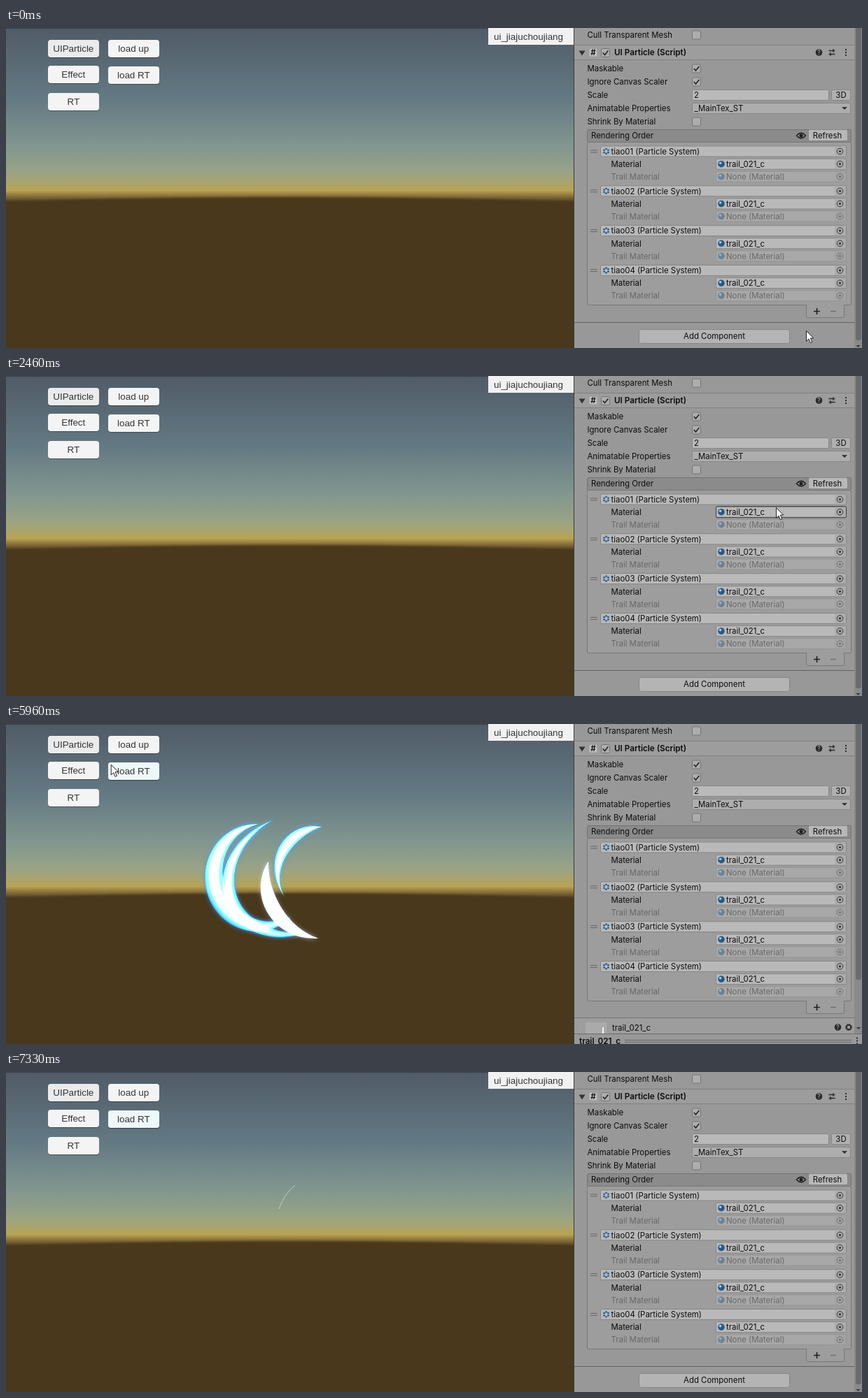
These frames come from a looping animation (1223 px wide and 458 px high, 8590 ms). An HTML page with a canvas:

```html
<!DOCTYPE html>
<html lang="en">
<head>
<meta charset="utf-8">
<title>UI particle preview</title>
<style>
  html, body { margin: 0; width: 100%; height: 100%; overflow: hidden; background: #989898; }
  svg, canvas { position: absolute; left: 0; top: 0; display: block; }
  text { font: 11.4px Inter, sans-serif; fill: #0b0b0b; white-space: pre; }
  .bold { font-size: 11.7px; font-weight: 600; }
  .dim { fill: #686868; }
  .mid { text-anchor: middle; }
  .game { font: 13.4px "Liberation Sans", Arial, sans-serif; fill: #343434; }
  #tint { animation: tint 8590ms step-end infinite; }
  @keyframes tint { 0% { opacity: 0; } 68.8%, 100% { opacity: 1; } }
</style>
</head>
<body>
<svg id="ui" width="1223" height="458" viewBox="0 0 1223 458"></svg>
<canvas id="fx" width="811" height="458"></canvas>
<svg width="1223" height="458" viewBox="0 0 1223 458">
  <path id="cursor" d="M.5.5V15.2L3.9 12 6.4 17.6 8.8 16.5 6.3 11H10.7Z" fill="#fff" stroke="#222"/>
</svg>
<script>
const LOOP = 8590;
const $ = id => document.getElementById(id);
const range = n => [...Array(n).keys()];
const show = (id, on) => $(id).setAttribute('visibility', on ? 'visible' : 'hidden');

// ---- static interface ----
const rect = (x, y, w, h, fill, extra = '') =>
  `<rect x="${x}" y="${y}" width="${w}" height="${h}" fill="${fill}" ${extra}/>`;
const text = (x, y, s, cls = '') => `<text x="${x}" y="${y + 4.2}" class="${cls}">${s}</text>`;
const path = (d, color, w = 1.2) => `<path d="${d}" fill="none" stroke="${color}" stroke-width="${w}"/>`;
const circle = (x, y, r, fill, extra = '') => `<circle cx="${x}" cy="${y}" r="${r}" fill="${fill}" ${extra}/>`;
const ring = (x, y, r, extra = '') => circle(x, y, r, 'none', `stroke="#2c2c2c" ${extra}`);
const box = (x, y, w, h, fill, line = '#868686', r = 2) =>
  rect(x + .5, y + .5, w - 1, h - 1, fill, `rx="${r}" stroke="${line}"`);
const field = (x, y, w) => box(x, y, w, 16, '#b9b9b9');
const arrow = (x, y, w, h) => `<path d="M${x - w} ${y - h}h${2 * w}l${-w} ${2 * h}z" fill="#333"/>`;
const dots = (x, y) => range(3).map(i => rect(x - 1, y - 5 + 4 * i, 2, 2, '#2a2a2a')).join('');
const help = (x, y) => circle(x, y, 4.8, '#2b2b2b') +
  `<text x="${x}" y="${y + 3.2}" class="mid" style="font-size:8.5px;fill:#bbb">?</text>`;

const gameButton = (x, y, s, fill = '#f4f4f4') =>
  rect(x, y + 1, 73, 25, '#20262b', 'rx="4" opacity=".5"') + rect(x, y, 73, 25, fill, 'rx="4"') +
  text(x + 36.3, y + 12.8, s, 'game mid');

const check = (x, y, on) => box(x, y - 6.5, 13, 13, '#adadad', '#747474') +
  (on ? path(`M${x + 2.8} ${y}l2.7 3 4.8-6`, '#222', 1.6) : '');
const checkRow = (y, label, on) => text(830.5, y, label) + check(980, y, on);

const picker = y => rect(1184, y - 7, 16, 14, '#adadad') + ring(1191.5, y, 4.3) + circle(1191.5, y, 1.6, '#2c2c2c');

function material(y, label, value, cls = '') {
  return text(864.5, y, label, cls) + `<g opacity="${cls ? .4 : 1}">` + field(1014, y - 8, 187) +
    circle(1022, y, 4.8, '#255a8c') + circle(1020.6, y - 1.5, 1.8, '#a6cae6') + picker(y) + '</g>' +
    text(1029, y, value, cls);
}

const rowY = i => 176.5 + i * 56.8;

function particle(i) {
  const y = rowY(i);
  const icon = range(6).map(n => {
    const a = n * Math.PI / 3 + Math.PI / 2;
    return circle(857.5 + 3.4 * Math.cos(a), y + 3.4 * Math.sin(a), 1.4, '#285f95');
  }).join('');
  return path(`M835 ${y - 1.5}h10m-10 3h10`, '#666', 1) +
    field(849, y - 8, 352) + icon + text(864.5, y, `tiao0${i + 1} (Particle System)`) + picker(y) +
    material(y + 18.2, 'Material', 'trail_021_c') +
    material(y + 36.2, 'Trail Material', 'None (Material)', 'dim');
}

const scene = `
  <defs>
    <linearGradient id="sky" x1="0" y1="0" x2="0" y2=".546">
      <stop offset="0" stop-color="#505b67"/><stop offset=".4" stop-color="#637983"/>
      <stop offset=".68" stop-color="#82978f"/><stop offset=".82" stop-color="#98a286"/>
      <stop offset=".88" stop-color="#a7a470"/><stop offset=".93" stop-color="#b9a353"/>
      <stop offset=".955" stop-color="#937b3f"/><stop offset="1" stop-color="#4b3820"/>
    </linearGradient>
    <filter id="soft" x="-5%" y="-5%" width="110%" height="110%"><feGaussianBlur stdDeviation="1.6"/></filter>
  </defs>` +
  rect(0, 0, 811, 458, 'url(#sky)') +
  '<path d="M-20 249Q405 235 831 249V480H-20Z" fill="#4a371e" filter="url(#soft)"/>' +
  rect(0, 0, 811, 1, '#3b4249') +
  gameButton(60, 17, 'UIParticle', '#ebebeb') + gameButton(146, 17, 'load up') +
  gameButton(60, 54, 'Effect') + gameButton(146, 55, 'load RT') + gameButton(60, 93, 'RT') +
  `<g id="tint">${gameButton(146, 55, 'load RT', '#eef7f9')}</g>` +
  rect(689, 0, 122, 24, '#f1f1f1') + text(697, 12.5, 'ui_jiajuchoujiang', 'game');

const inspector =
  rect(811, 0, 412, 458, '#989898') + rect(811, 0, 1, 458, '#3c3c3c') +
  checkRow(10, 'Cull Transparent Mesh') +
  rect(812, 24, 400, 22, '#808080') + rect(812, 25, 400, 20, '#9d9d9d') +
  arrow(823, 36, 4.5, 3.5) + box(833, 29, 12, 12, '#c4c4c4', '#aaa') + text(839, 35, '#', 'mid bold') +
  check(850, 35.5, true) + text(869, 35, 'UI Particle (Script)', 'bold') + help(1161.5, 35) +
  path('M1175.5 32.5h9m-9 5h9M1182 30v5m-4 0v5', '#2b2b2b', 1.3) + dots(1200, 35) +
  checkRow(58, 'Maskable', true) + checkRow(77, 'Ignore Canvas Scaler', true) +
  text(830.5, 96, 'Scale') + field(980, 88, 196) + text(983, 96, '2') +
  box(1179, 88, 28, 16, '#b0b0b0') + text(1193, 96, '3D', 'mid') +
  text(830.5, 115, 'Animatable Properties') + box(980, 107, 227, 16, '#adadad') +
  text(983.5, 114.5, '_MainTex_ST') + arrow(1198, 115, 4, 2) +
  checkRow(134, 'Shrink By Material') +
  box(830, 145, 378, 19, '#8b8b8b', '#737373') + text(836, 154, 'Rendering Order') +
  path('M1129.5 154Q1136 146.5 1142.5 154Q1136 161.5 1129.5 154Z', '#1d1d1d', 1.3) +
  circle(1136, 154, 2.5, '#1d1d1d') + box(1146, 145, 57, 17, '#b8b8b8') + text(1173.5, 153.5, 'Refresh', 'mid') +
  box(830, 163, 378, 234, '#9d9d9d', '#777') + range(4).map(particle).join('') +
  box(1143, 396, 55, 19, '#9d9d9d', '#777') + rect(1144, 395, 53, 2, '#9d9d9d') +
  path('M1154 405.5h9m-4.5-4.5v9', '#222', 1.7) + path('M1178 405.5h8', '#707070', 1.5) +
  rect(812, 421, 400, 1, '#626262') +
  box(904, 431, 216, 21, '#b4b4b4', '#868686', 3) + text(1012, 441, 'Add Component', 'mid') +
  rect(1212, 0, 11, 458, '#8a8a8a') + rect(1214, -6, 8, 453, '#6b6b6b', 'rx="3" id="thumb"') +
  `<g id="tip">${arrow(1217.5, 455.5, 3, 1.6)}</g>`;

const preview = '<g id="preview">' +
  rect(812, 420, 400, 24, '#9d9d9d') + rect(812, 420, 400, 1, '#737373') +
  rect(828, 427, 30, 16, '#aaa') + rect(852, 434, 2, 9, '#f2f2f2') +
  text(866, 435, 'trail_021_c') + help(1188.5, 434) +
  ring(1204, 434, 3.2, 'stroke-width="2"') + ring(1204, 434, 4.6, 'stroke-dasharray="1.8"') +
  arrow(1218, 435.5, 3, 1.6) +
  rect(812, 443, 411, 15, '#989898') + rect(812, 443, 411, 1, '#6c6c6c') +
  text(819, 454, 'trail_021_c', 'bold') + path('M884 452.5h324m-324 3h324', '#666', 1) +
  dots(1216, 453.5) + '</g>';

$('ui').innerHTML = scene + inspector + preview +
  '<rect id="hover" height="16" rx="2" fill="none" stroke="#3a3a3a"/>';

// ---- pointer moves: start, end, halfway point, end point; equal times are jumps ----
const moves = [
  [0, 0, 0, 0, 1143, 433],
  [70, 70, 0, 0, 977, 374],
  [270, 680, 787, 238, 835, 214],
  [1060, 1750, 1080, 200, 949, 375],
  [1750, 1880, 912, 380, 880, 368],
  [1960, 2460, 930, 270, 1100, 188],
  [2510, 2780, 1125, 290, 1060, 365],
  [2860, 3710, 1190, 250, 905, 174],
  [3780, 3780, 0, 0, 891, 204],
  [3840, 3840, 0, 0, 520, 204],
  [3920, 3920, 0, 0, 200, 189],
  [4120, 4940, 100, 85, 98, 52],
  [5010, 5220, 99, 42, 99, 32],
  [5620, 6100, 125, 40, 197, 96]
];

// Parabola through a, m (halfway) and b
const bend = (a, m, b, k) => a + k * (4 * m - 3 * a - b + k * 2 * (a + b - 2 * m));

function pointer(t) {
  let x = 0, y = 0;
  for (const [t0, t1, mx, my, bx, by] of moves) {
    if (t < t0) break;
    const k = t >= t1 ? 1 : (t - t0) / (t1 - t0);
    x = bend(x, mx, bx, k);
    y = bend(y, my, by, k);
  }
  return [x, y];
}

function showHover(x, y) {
  const fields = range(4).flatMap(i => [[849, rowY(i)], [1014, rowY(i) + 18.2]]);
  const hit = fields.find(([left, cy]) => x >= left && x < 1201 && Math.abs(y - cy) < 8);
  show('hover', hit);
  if (!hit) return;
  $('hover').setAttribute('x', hit[0] + .5);
  $('hover').setAttribute('y', hit[1] - 8);
  $('hover').setAttribute('width', 1200 - hit[0]);
}

// ---- swirling trails: elliptic bands, angles in degrees, `grow` opens the end into a spiral ----
const blue = 'rgba(72,150,245,.8)', cyan = 'rgba(125,240,255,.85)', white = 'rgba(225,236,255,.8)';
const trails = [
  { cx: 367, cy: 216, rx: 70, ry: 73, tilt: 0, from: 65, to: 314, width: 27, skew: .95, top: cyan, low: blue },
  { cx: 416, cy: 214, rx: 101, ry: 84, tilt: -25, from: 116, to: 354, width: 18, skew: .85, top: blue, low: blue },
  { cx: 455, cy: 213, rx: 67, ry: 66, tilt: 0, from: 158, to: 382, width: 16, skew: 1.4, top: cyan, low: cyan },
  { cx: 456, cy: 222, rx: 85, ry: 85, tilt: 0, from: 188, to: -95, width: 21, skew: .9, grow: .95,
    top: 'rgba(170,190,205,0)', low: white }
];
const ctx = $('fx').getContext('2d');
const rad = deg => deg * Math.PI / 180;
const ease = k => (k = Math.min(1, Math.max(0, k)), k * k * (3 - 2 * k));

function bandPoint(b, u, offset, turn) {
  const a = rad(b.from + (b.to - b.from) * u + turn), tilt = rad(b.tilt);
  const r = 1 + (b.grow || 0) * u ** 6;
  const x = (b.rx * r + offset) * Math.cos(a), y = (b.ry * r + offset) * Math.sin(a);
  return [b.cx + x * Math.cos(tilt) - y * Math.sin(tilt), b.cy + x * Math.sin(tilt) + y * Math.cos(tilt)];
}

function fillBand(b, tail, head, width, turn, fill) {
  const N = 60;
  ctx.beginPath();
  for (const side of [1, -1]) {
    for (let i = 0; i <= N; i++) {
      const s = side > 0 ? i / N : 1 - i / N;
      const half = width / 2 * Math.max(0, Math.sin(Math.PI * s ** b.skew));
      ctx.lineTo(...bandPoint(b, tail + (head - tail) * s, side * half, turn));
    }
  }
  ctx.fillStyle = fill;
  ctx.fill();
}

function drawTrail(b, i, t) {
  const head = ease((t - 5700 - i * 40) / 350);
  const tail = ease((t - 6250 - i * 100) / 560);
  if (head - tail < .01) return;
  const turn = Math.sign(b.to - b.from) * (t - 6170) * .045;
  const reach = b.ry * (1 + (b.grow || 0));
  const body = ctx.createLinearGradient(0, b.cy - reach, 0, b.cy + b.ry * .6);
  body.addColorStop(0, b.top);
  body.addColorStop(b.grow ? .6 : .5, b.grow ? white : cyan);
  body.addColorStop(1, b.low);

  ctx.globalAlpha = 1 - ease((t - 6600) / 600) * .6;
  ctx.shadowBlur = 6;
  ctx.shadowColor = b.grow ? 'rgba(200,215,255,.4)' : 'rgba(60,150,255,.9)';
  fillBand(b, tail, head, b.width, turn, body);
  ctx.shadowColor = b.grow ? white : cyan;
  fillBand(b, tail, head, b.width * .55, turn, body);
}

function drawEffect(t) {
  ctx.clearRect(0, 0, 811, 458);
  ctx.globalCompositeOperation = 'lighter';
  trails.forEach((b, i) => drawTrail(b, i, t));
  if (t < 7050) return;
  ctx.globalAlpha = 1;
  ctx.shadowBlur = 0;
  ctx.strokeStyle = 'rgba(225,230,205,.65)';
  ctx.beginPath();
  ctx.moveTo(390, 196);
  ctx.quadraticCurveTo(397, 175, 413, 162);
  ctx.stroke();
}

function frame(now) {
  const t = now % LOOP;
  const [x, y] = pointer(t);
  $('cursor').setAttribute('transform', `translate(${x} ${y})`);
  show('cursor', t < 6510);
  showHover(x, y);

  const open = t >= 5690 && t < 7190;
  show('preview', open);
  show('tip', !open);
  $('thumb').setAttribute('height', open ? 372 : 453);

  drawEffect(t);
  requestAnimationFrame(frame);
}
frame(0);
</script>
</body>
</html>
```
